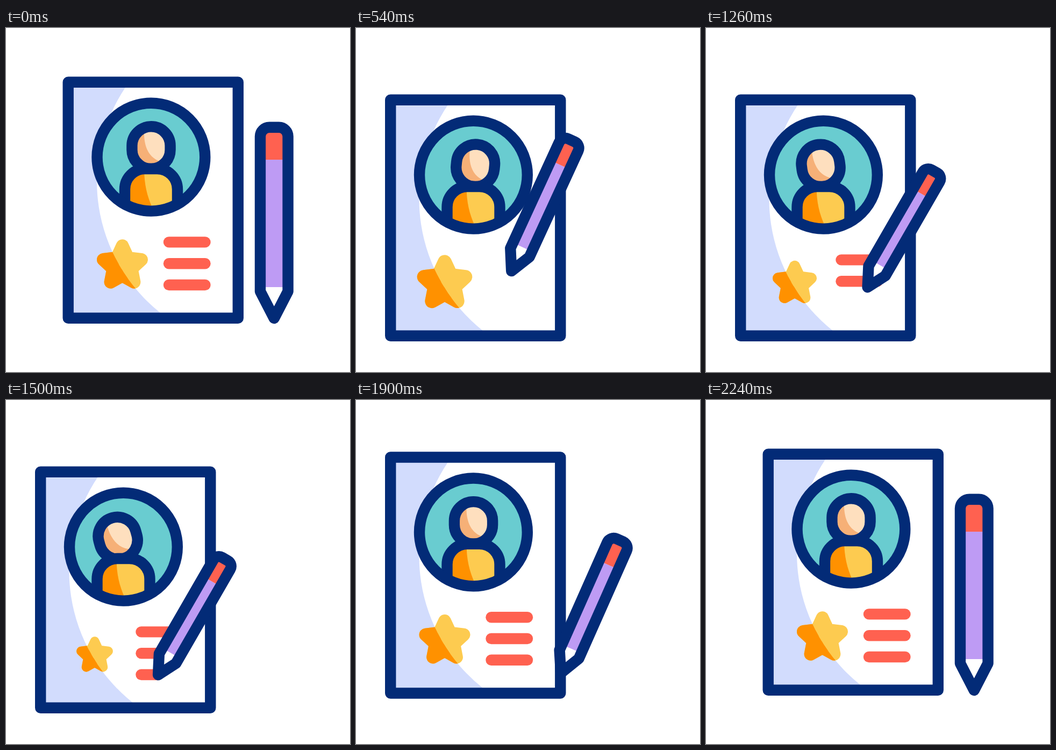
Recreate the animation shown at these times as an HTML page. Size 640 by 640 pixels, loop 2400 ms.

```html
<!DOCTYPE html>
<html lang="en">
<head>
<meta charset="utf-8">
<title>Profile writing</title>
<style>
  html, body { margin: 0; width: 100%; height: 100%; overflow: hidden; background: #fff; }
  svg { display: block; width: 100%; height: 100%; }
  .ink { fill: none; stroke: #032b77; stroke-width: 20.4; stroke-linejoin: round; stroke-linecap: round; }
  .rule { stroke: #ff6150; stroke-width: 20.4; stroke-linecap: round; }
  .star { stroke-width: 24; stroke-linejoin: round; }
  .gold { fill: #fdcb50; stroke: #fdcb50; }
  .amber { fill: #ff9100; stroke: #ff9100; }
</style>
</head>
<body>
<svg viewBox="0 0 640 640">
  <defs>
    <path id="shade" d="M116 110H222.5A313 313 0 0 0 287.2 530H116Z"/>
    <rect id="face" x="234.4" y="183.3" width="71.2" height="78.7" rx="35.6"/>
    <path id="torso" d="M221 345V300A38 38 0 0 1 259 262H281A38 38 0 0 1 319 300V345Z"/>
    <circle id="ring" cx="269.9" cy="240.2" r="100.4"/>
    <path id="starShape"/>
    <clipPath id="shadeClip"><use href="#shade"/></clipPath>
    <clipPath id="faceClip"><use href="#face"/></clipPath>
    <clipPath id="torsoClip"><use href="#torso"/></clipPath>
    <clipPath id="ringClip"><use href="#ring"/></clipPath>
    <clipPath id="penClip"><path id="penMask"/></clipPath>
  </defs>

  <g id="page">
    <rect x="115.7" y="100.7" width="316.1" height="439" fill="#fff"/>
    <use href="#shade" fill="#d2dcfd"/>
    <rect class="ink" x="115.7" y="100.7" width="316.1" height="439"/>

    <use href="#ring" fill="#69ccd0"/>
    <g clip-path="url(#ringClip)">
      <g id="head">
        <use href="#face" fill="#fedfbe"/>
        <path clip-path="url(#faceClip)" fill="#f6b077" d="M258 180C254 212 261 241 289 249L285 265H230V180Z"/>
        <use href="#face" class="ink"/>
      </g>
      <use href="#torso" fill="#fdcb50"/>
      <path clip-path="url(#torsoClip)" fill="#ff9100" d="M257 260C257 290 262 312 273 336V345H220V260Z"/>
      <use href="#torso" class="ink"/>
    </g>
    <use href="#ring" class="ink"/>

    <g class="star gold"><use href="#starShape"/></g>
    <g class="star amber" clip-path="url(#shadeClip)"><use href="#starShape"/></g>
    <g id="rules"></g>
  </g>

  <g id="pen">
    <path id="penBase" fill="#fff"/>
    <g clip-path="url(#penClip)">
      <rect id="barrel" x="-30" width="60" fill="#be9bf4"/>
      <rect id="eraser" x="-30" width="60" fill="#ff6150"/>
    </g>
    <path id="penInk" class="ink"/>
  </g>
</svg>
<script>
const LOOP = 2400;
const WRITE = 607;   // start of the first written rule
const STROKE = 200;  // one pass of the pen
const RULE_X = 303, RULE_W = 67.5, RULE_Y = 398.4, RULE_GAP = 39.8;
const SHIFT = [-51.5, 33];
const REST = [498.8, 362.4];

const $ = id => document.getElementById(id);
const set = (el, attrs) => { for (const k in attrs) el.setAttribute(k, attrs[k]); };
const mix = (a, b, p) => a + (b - a) * p;

// Linear interpolation over [time, value] pairs
function track(t, keys) {
  if (t <= keys[0][0]) return keys[0][1];
  for (let i = 1; i < keys.length; i++) {
    const [t0, v0] = keys[i - 1], [t1, v1] = keys[i];
    if (t < t1) return mix(v0, v1, (t - t0) / (t1 - t0));
  }
  return keys[keys.length - 1][1];
}

const rules = [0, 1, 2].map(i => {
  const line = document.createElementNS("http://www.w3.org/2000/svg", "line");
  const y = RULE_Y + RULE_GAP * i;
  set(line, { class: "rule", x1: RULE_X, y1: y, y2: y });
  $("rules").append(line);
  return line;
});

// Pen centre: rest, zigzag over the three rules, back to rest
const penX = [[220, REST[0]]], penY = [[220, REST[1]]];
for (let i = 0; i < 3; i++) {
  const start = WRITE + 2 * STROKE * i;
  const x = RULE_X + SHIFT[0] + 62;
  const y = RULE_Y + RULE_GAP * i + SHIFT[1] - 107.4;
  penX.push([start, x], [start + STROKE, x + RULE_W]);
  penY.push([start, y], [start + STROKE, y]);
}
penX.push([1820, 420], [2220, REST[0]]);
penY.push([1820, 390], [2220, REST[1]]);

const pageX = [[200, 0], [400, SHIFT[0]], [2000, SHIFT[0]], [2200, 0]];
const pageY = [[200, 0], [400, SHIFT[1]], [1600, SHIFT[1]], [1800, -22], [2000, SHIFT[1]], [2200, 0]];
const sway = [[400, 0], [800, 1], [1425, -1], [1600, -1], [1800, 0]];
const grip = [[220, 0], [610, 1], [1820, 1], [2220, 0]];

function drawStar(scale) {
  const pts = [];
  for (let i = 0; i < 10; i++) {
    const r = i % 2 ? 18 : 37.3, a = i * Math.PI / 5;
    pts.push((r * Math.sin(a)).toFixed(2) + " " + (-r * Math.cos(a)).toFixed(2));
  }
  set($("starShape"), {
    d: "M" + pts.join("L") + "Z",
    transform: `translate(216.5 442.5) scale(${scale})`
  });
}

function drawPen(t) {
  const g = track(t, grip), s = mix(1, 0.7, g);
  const w = 25.8 * s, top = -355.3 * s, neck = -50 * s, r = 17 * s;
  const d = `M0 0L${-w} ${neck}V${top + r}A${r} ${r} 0 0 1 ${r - w} ${top}` +
            `H${w - r}A${r} ${r} 0 0 1 ${w} ${top + r}V${neck}Z`;
  for (const id of ["penMask", "penBase", "penInk"]) set($(id), { d });
  const low = mix(-58, -47, g), high = mix(-295, -200.5, g);
  set($("barrel"), { y: high, height: low - high });
  set($("eraser"), { y: top, height: high - top });
  set($("pen"), {
    transform: `translate(${track(t, penX)} ${track(t, penY)}) rotate(${30 * g}) translate(0 ${-top / 2})`
  });
}

function draw(t) {
  set($("page"), { transform: `translate(${track(t, pageX)} ${track(t, pageY)})` });

  const p = track(t, sway);
  set($("head"), { transform: `rotate(${15.3 * p} 269.9 262)` });
  drawStar(1 + p * (p > 0 ? 0.23 : 0.285));

  rules.forEach((line, i) => {
    const start = WRITE + 2 * STROKE * i;
    const n = track(t, [[200, 1], [400, 0], [start, 0], [start + STROKE, 1]]);
    set(line, { x2: RULE_X + RULE_W * n, visibility: n > 0 ? "visible" : "hidden" });
  });

  drawPen(t);
}

const begin = performance.now();
function tick() {
  draw((performance.now() - begin) % LOOP);
  requestAnimationFrame(tick);
}
tick();
</script>
</body>
</html>
```
